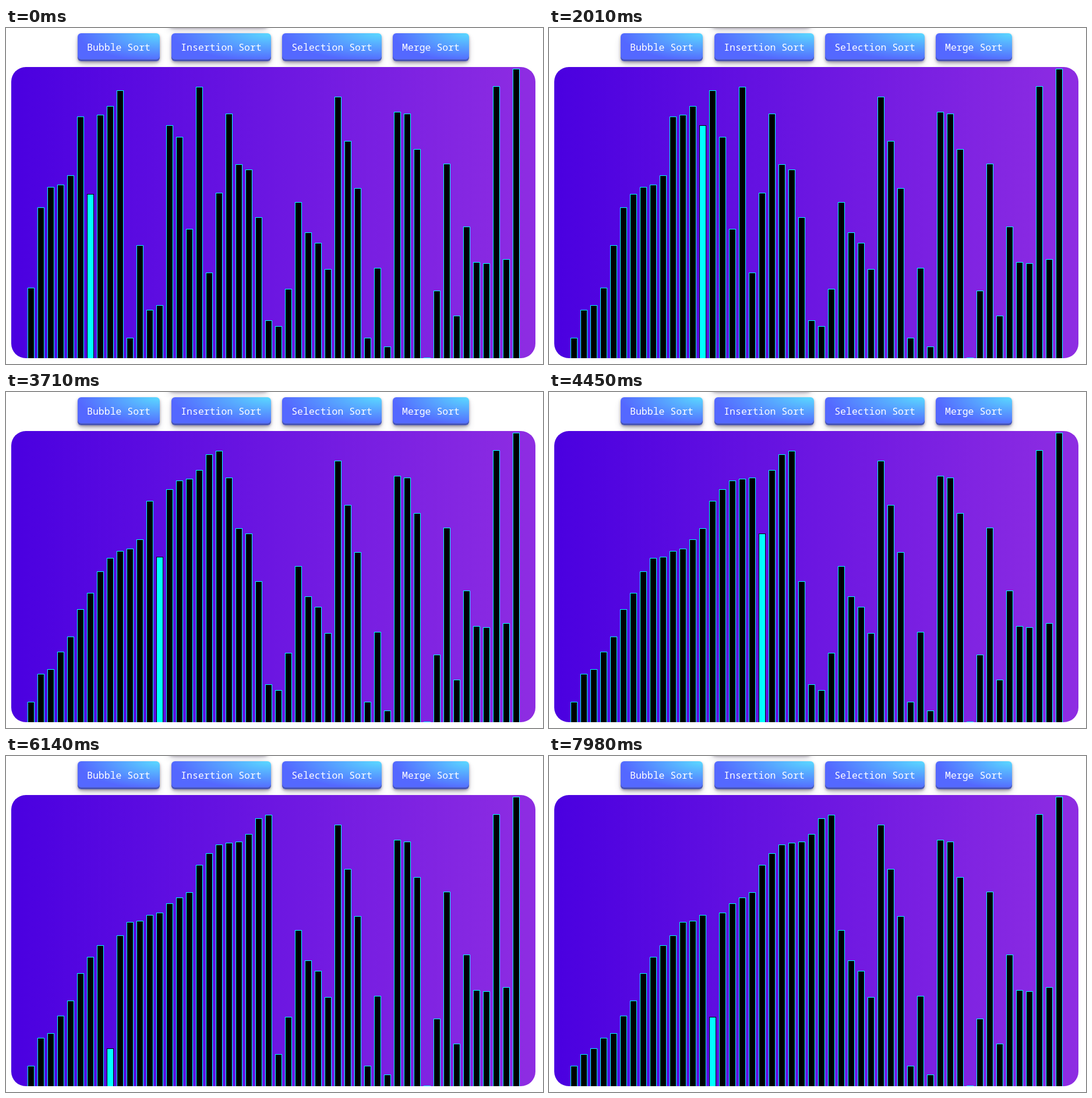
Write an HTML page with a canvas that moves like this. It is 922 px wide and 577 px high and loops after 8 s.

```html
<!DOCTYPE html>
<html lang="en">
<head>
<meta charset="utf-8">
<title>Sorting visualizer</title>
<style>
  html, body { margin: 0; width: 100%; height: 100%; overflow: hidden; background: #fff; }
  body { position: relative; }
  canvas {
    position: absolute; left: 9px; top: 67px; border-radius: 25px;
    background: linear-gradient(to right, #4a00e0, #8e2de2);
  }
  .btn {
    position: absolute; top: 9px; height: 48px; border-radius: 6px;
    background: radial-gradient(100% 100% at 100% 0, #5adaff 0, #5468ff 100%);
    box-shadow: rgba(45, 35, 66, .4) 0 2px 4px, rgba(45, 35, 66, .3) 0 7px 13px -3px,
      rgba(58, 65, 111, .5) 0 -3px 0 inset;
    color: #fff; font: 16.5px/48px "Noto Sans Mono", monospace;
    text-align: center; white-space: nowrap;
  }
</style>
</head>
<body>
<div class="btn" style="left:279px;top:-50px;width:171px"></div>
<div class="btn" style="left:123px;width:141px">Bubble Sort</div>
<div class="btn" style="left:284px;width:171px">Insertion Sort</div>
<div class="btn" style="left:474px;width:171px">Selection Sort</div>
<div class="btn" style="left:664px;width:131px">Merge Sort</div>
<canvas id="chart" width="900" height="500"></canvas>
<script>
const LOOP = 8000;
const TOP = 67, HEIGHT = 500, FIRST_X = 28, PITCH = 17, BAR = 12;

// Top edge of each bar on the stage; a smaller value is a taller bar.
const START = [
  446, 308, 273, 269, 253, 152, 285, 149, 134, 107,
  532, 373, 484, 476, 167, 187, 345, 101, 420, 283,
  147, 234, 243, 325, 502, 512, 448, 299, 351, 369,
  414, 118, 194, 275, 532, 412, 547, 144, 147, 208,
  566, 451, 233, 494, 341, 402, 404, 100, 397, 70
];

// Pace of the sort: [ms, screen updates so far, swaps so far]
const PACE = [
  [0, 0, 0], [2010, 30, 46], [2960, 44, 67], [4450, 66, 103], [5450, 81, 125],
  [6870, 102, 158], [7590, 113, 175], [7980, 119, 184]
];

const ctx = document.getElementById("chart").getContext("2d");

function swapsAt(t) {
  const i = PACE.findIndex(p => p[0] > t);
  if (i < 0) return PACE[PACE.length - 1][2];
  const [t0, u0, s0] = PACE[i - 1], [t1, u1, s1] = PACE[i];
  const updates = u1 - u0;
  const done = Math.floor((t - t0) / (t1 - t0) * updates + 0.05);
  return s0 + Math.round((s1 - s0) * done / updates);
}

// Insertion sort, picked up while the bar from slot 9 has reached slot 6.
function sortState(swaps) {
  const tops = START.slice();
  let next = 10, key = 6;
  while (swaps-- > 0) {
    while (key === 0 || tops[key - 1] >= tops[key]) key = next++;
    [tops[key - 1], tops[key]] = [tops[key], tops[key - 1]];
    key--;
  }
  return { tops, key };
}

function drawBar(slot, top, active) {
  const x = FIRST_X + slot * PITCH, y = top - TOP;
  ctx.fillStyle = active ? "#000" : "#0ff";
  ctx.fillRect(x, y, BAR, HEIGHT - y);
  ctx.fillStyle = active ? "#0ff" : "#000";
  ctx.fillRect(x + 1, y + 1, BAR - 2, HEIGHT - y);
}

let shown = -1;
function frame() {
  const swaps = swapsAt(performance.now() % LOOP);
  if (swaps !== shown) {
    shown = swaps;
    const { tops, key } = sortState(swaps);
    ctx.clearRect(0, 0, 900, HEIGHT);
    tops.forEach((top, slot) => drawBar(slot, top, slot === key));
  }
  requestAnimationFrame(frame);
}
frame();
</script>
</body>
</html>
```
